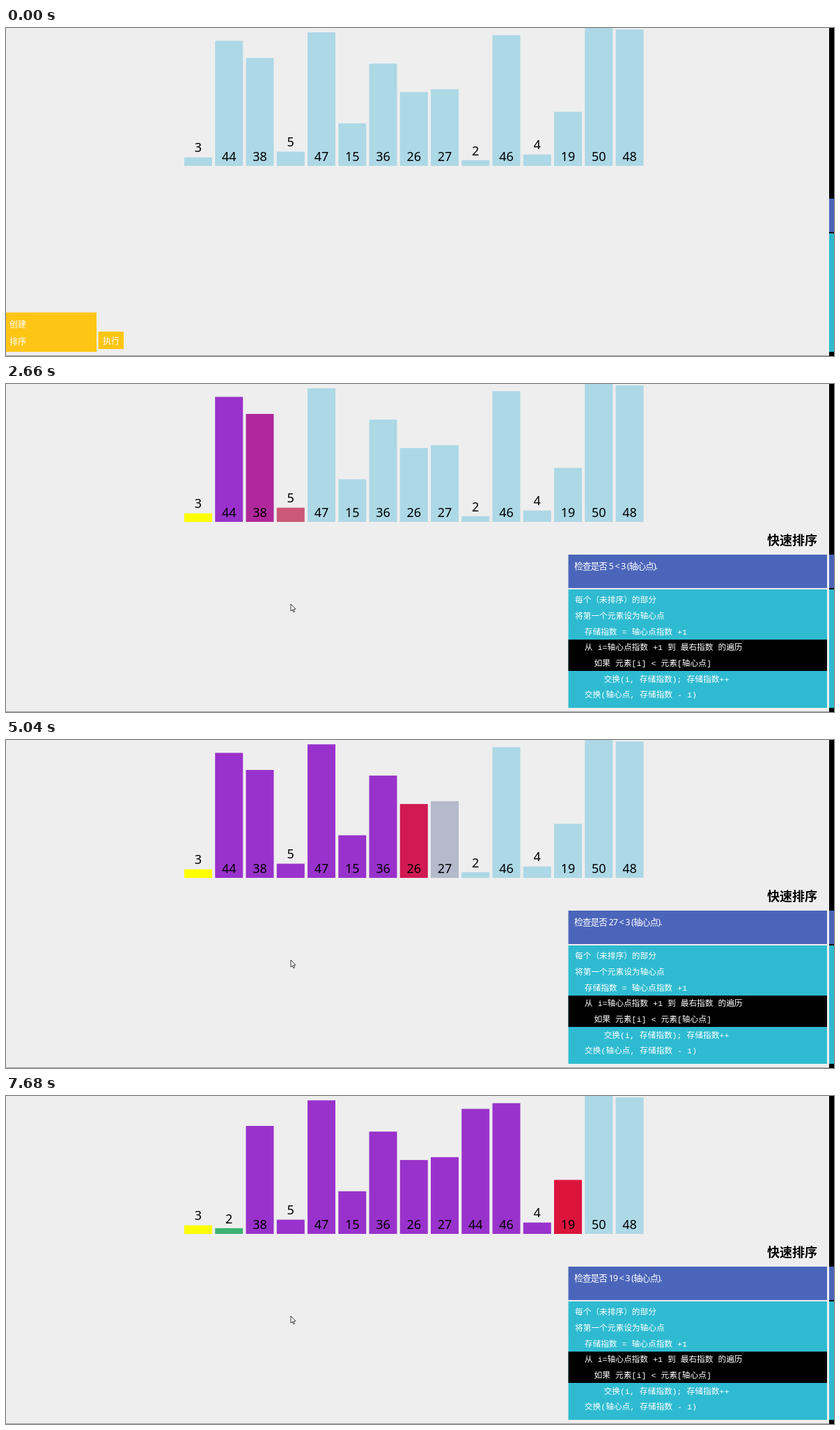
These frames come from a looping animation (1189x471 px, 7.99 s). An HTML page with a canvas:

```html
<!DOCTYPE html>
<html lang="zh-CN">
<head>
<meta charset="utf-8">
<title>快速排序</title>
<style>
html, body { margin: 0; width: 100%; height: 100%; overflow: hidden; background: #eee; }
canvas { display: block; }
</style>
</head>
<body>
<canvas id="stage" width="1189" height="471"></canvas>
<script>
const ctx = document.getElementById('stage').getContext('2d');
const LOOP = 7990;
const FADE = 250;

// The picture only changes at these moments, like a low-rate screen recording.
const TICKS = [0, 280, 420, 560, 690, 830, 970, 1120, 1270, 1550, 1690, 1830, 2090, 2230,
  2660, 2810, 3120, 3270, 3560, 3700, 3850, 4040, 4190, 4620, 4750, 5020, 5160,
  5560, 5680, 5950, 6090, 6220, 6500, 6620, 7010, 7130, 7410, 7550, 7680];

const BLUE = [173, 216, 230], YELLOW = [255, 255, 0], CRIMSON = [220, 20, 60],
  ORCHID = [153, 50, 204], GREEN = [60, 179, 113];

const CJK = '"Noto Sans CJK SC", "Noto Sans CJK", sans-serif';
const FONT = {
  label: '18px "Noto Sans", "Open Sans", sans-serif',
  title: `bold 18px ${CJK}`,
  menu: `12px ${CJK}`,
  status: `12.6px "Noto Sans", ${CJK}`,
  code: `11.7px "Liberation Mono", "Noto Sans CJK SC", "Noto Sans CJK", monospace`
};

const CODE = [
  [0, '每个（未排序）的部分'],
  [0, '将第一个元素设为轴心点'],
  [1, '存储指数 = 轴心点指数 +1'],
  [1, '从 i=轴心点指数 +1 到 最右指数 的遍历'],
  [2, '如果 元素[i] < 元素[轴心点]'],
  [3, '交换(i, 存储指数); 存储指数++'],
  [1, '交换(轴心点, 存储指数 - 1)']
];

const bars = [3, 44, 38, 5, 47, 15, 36, 26, 27, 2, 46, 4, 19, 50, 48]
  .map((value, slot) => ({ value, slot, paints: [] }));
const captions = [];
const paint = (i, at, color) => bars[i].paints.push({ at, color });
const caption = (at, rows, ...lines) => captions.push({ at, rows, lines });

// Script of the sort
const PIVOT_AT = 1050, SWAP_AT = 5880;
const CHECKS = [1500, 2010, 2520, 3000, 3485, 3970, 4455, 4935, 5420, 6370, 6870, 7350];

paint(0, PIVOT_AT, YELLOW);
caption(PIVOT_AT, [1, 2], '选择 3 为轴心点. (存储指数 = 1.)');
CHECKS.forEach((at, k) => {
  const i = k + 1;
  if (i > 1) paint(i - 1, at, bars[i - 1].value < bars[0].value ? GREEN : ORCHID);
  paint(i, at, CRIMSON);
  caption(at, [3, 4], `检查是否 ${bars[i].value} < 3 (轴心点).`);
});
caption(SWAP_AT, [3, 5],
  '2 < 3 (轴心点) 是真（True）. 将指数为 9 (值 = {val}) 和在存储指数的元',
  '素 (指数 = 1, 值 = 44) 进行交换. (交换过后在存储指数上的值 = {2}).');
captions.sort((a, b) => a.at - b.at);

const clamp = x => Math.min(1, Math.max(0, x));
const cubic = x => x < 0.5 ? 4 * x ** 3 : 1 - 4 * (1 - x) ** 3;
const swing = x => 0.5 - Math.cos(Math.PI * x) / 2;
const progress = (t, start, span = FADE) => clamp((t - start) / span);
const mix = (a, b, p) => a + (b - a) * p;

function rect(x, y, w, h, color) {
  ctx.fillStyle = color;
  ctx.fillRect(x, y, w, h);
}

function text(str, x, y, font, color, align = 'left', spacing = 0) {
  ctx.font = font;
  ctx.fillStyle = color;
  ctx.textAlign = align;
  ctx.letterSpacing = spacing + 'px';
  ctx.fillText(str, x, y);
}

function drawBar(bar, i, t) {
  const target = i === 1 ? 9 : i === 9 ? 1 : bar.slot;
  const x = 256 + 44.25 * mix(bar.slot, target, cubic(progress(t, SWAP_AT)));
  const height = bar.value * 4.08;
  const top = 198 - height;
  const color = bar.paints.reduce((from, step) => {
    const p = cubic(progress(t, step.at));
    return from.map((c, k) => mix(c, step.color[k], p));
  }, BLUE);
  rect(x, top, 40, height, `rgb(${color.map(Math.round)})`);
  text(bar.value, x + 20, bar.value < 10 ? top - 7.3 : 190.6, FONT.label, '#000', 'center');
}

function drawMenu(t) {
  const open = 1 - swing(progress(t, 220, 400));
  if (open <= 0) return;
  ctx.save();
  ctx.beginPath();
  ctx.rect(0, 400, 170 * open, 71);
  ctx.clip();
  rect(0, 408.5, 130 * open, 56.5, '#ffc515');
  rect(132.5 * open, 436, 36.5, 25, '#ffc515');
  text('创建', 5, 430, FONT.menu, '#fff');
  text('排序', 5, 454.6, FONT.menu, '#fff');
  text('执行', 132.5 * open + 6.5, 453.6, FONT.menu, '#fff');
  ctx.restore();
}

function drawPanels(t) {
  const width = 371.5 * swing(progress(t, 220, 450));
  if (width <= 0) return;
  const left = 1179 - width;
  text('快速排序', 1093, 230.8, FONT.title, '#000');
  rect(left, 245, width, 48, '#4b65ba');
  rect(left, 295, width, 170, '#2ebbd1');
  if (width < 371) return;

  const now = captions.filter(c => c.at <= t).pop() || { rows: [], lines: [] };
  now.lines.forEach((line, i) =>
    text(line, 816, 266.4 + 16 * i, FONT.status, '#fff', 'left', -0.85));
  for (const row of now.rows) {
    const y = Math.round(298.8 + 22.7 * row);
    rect(left, y, width, Math.round(298.8 + 22.7 * (row + 1)) - y, '#000');
  }
  CODE.forEach(([indent, line], row) =>
    text(line, 817 + 13.8 * indent, 314.2 + 22.7 * row, FONT.code, '#fff'));
}

function drawCursor(t) {
  if (t < 420) return;
  const p = swing(progress(t, 350, 600));
  const q = progress(t, 970, 300);
  ctx.save();
  ctx.translate(mix(160, 407.5, p) + 1.5 * q, mix(448, 318.5, p) - 2.5 * q);
  ctx.beginPath();
  [[0, 0], [0, 10], [2.3, 8], [3.8, 11.5], [5.4, 10.8], [3.9, 7.4], [6.8, 7.2]]
    .forEach(([x, y]) => ctx.lineTo(x, y));
  ctx.closePath();
  ctx.fillStyle = '#fff';
  ctx.strokeStyle = '#222';
  ctx.lineWidth = 0.9;
  ctx.fill();
  ctx.stroke();
  ctx.restore();
}

function draw(t) {
  rect(0, 0, 1189, 471, '#eee');
  rect(0, 470, 1189, 1, '#a0a0a0');
  rect(1182, 0, 7, 471, '#000');
  rect(1182, 245, 7, 48, '#4b65ba');
  rect(1182, 295, 7, 170, '#2ebbd1');
  bars.forEach((bar, i) => drawBar(bar, i, t));
  drawMenu(t);
  drawPanels(t);
  drawCursor(t);
}

const began = performance.now();
function loop() {
  const t = (performance.now() - began) % LOOP;
  draw(TICKS.filter(tick => tick <= t).pop());
  requestAnimationFrame(loop);
}
loop();
</script>
</body>
</html>
```
